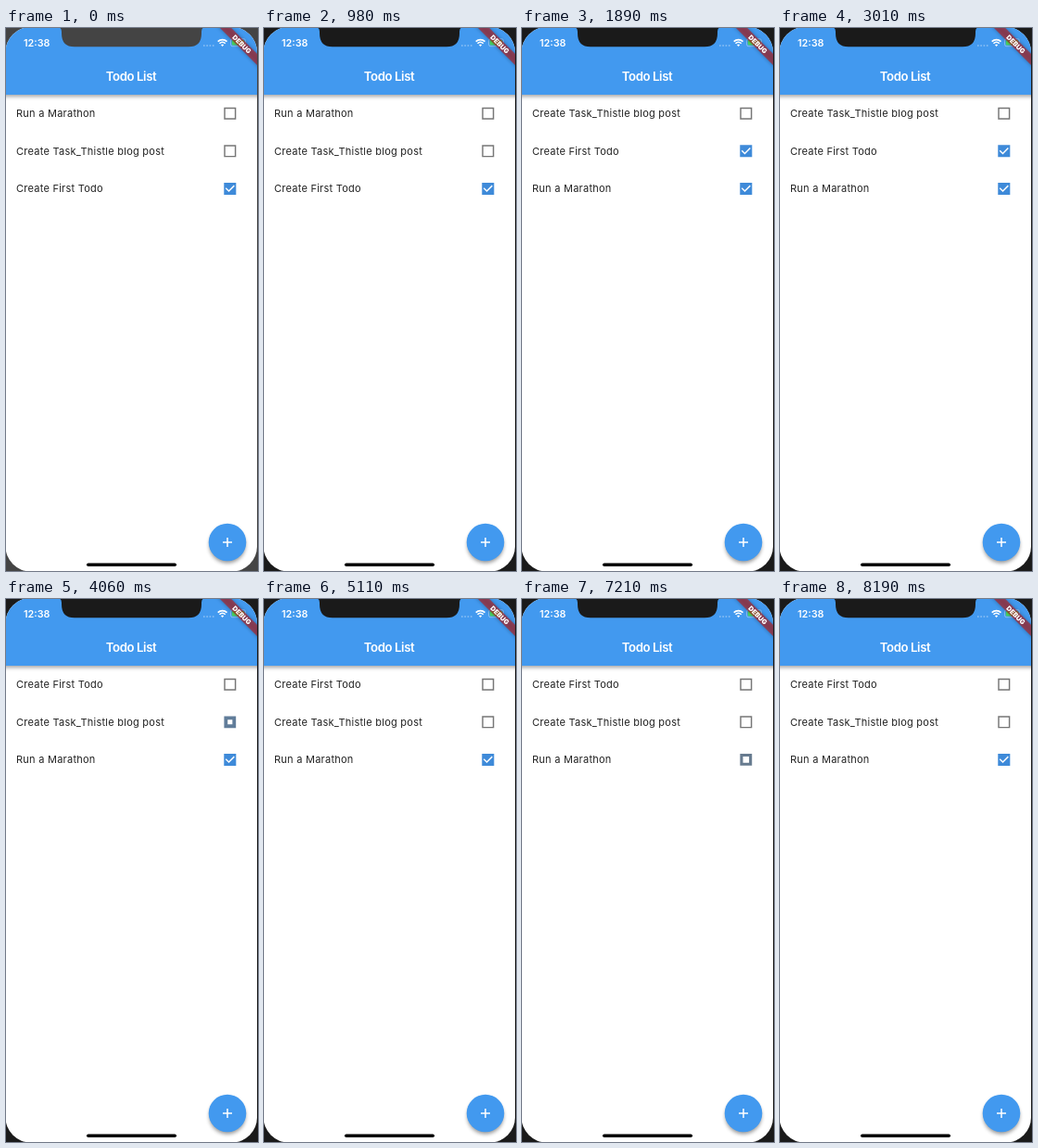
An HTML page for the animation above (8260 ms loop, 272 by 586 pixels).

```html
<!DOCTYPE html>
<html lang="en">
<head>
<meta charset="utf-8">
<title>Todo List</title>
<style>
  html, body { margin: 0; width: 100%; height: 100%; overflow: hidden; }
  svg { display: block; width: 272px; height: 586px; font-family: Inter, Roboto, sans-serif; }
  .row { font-size: 11px; letter-spacing: .25px; fill: #222; }
  .title { font-size: 13.2px; font-weight: 600; letter-spacing: -.4px; }
  .clock { font-size: 10.8px; font-weight: 600; }
  .debug { font-size: 7.2px; font-weight: 900; }
</style>
</head>
<body>
<svg viewBox="0 0 272 586">
  <defs>
    <clipPath id="screen"><rect x="-.5" y="-1" width="271.5" height="587.5" rx="27"/></clipPath>
    <filter id="blur" x="-50%" y="-50%" width="200%" height="200%"><feGaussianBlur stdDeviation="2.2"/></filter>
  </defs>
  <rect class="bezel" width="272" height="586"/>
  <g clip-path="url(#screen)">
    <rect width="272" height="586" fill="#fff"/>
    <g id="rows"></g>

    <rect x="-10" y="50" width="292" height="24" fill="#000" opacity=".36" filter="url(#blur)"/>
    <rect width="272" height="72" fill="#4299ef"/>
    <g fill="#fff">
      <text class="title" x="135" y="56.5" text-anchor="middle">Todo List</text>
      <text class="clock" x="19" y="20">12:38</text>
    </g>
    <path d="M213 19h12" stroke="#fff" stroke-width="1.6" stroke-dasharray="1.6 1.7" opacity=".4"/>
    <g fill="none" stroke="#fff" stroke-width="1.6">
      <path d="M228.7 14.6a7 7 0 0 1 9.8 0M230.5 16.7a4.4 4.4 0 0 1 6.2 0"/>
      <path d="M232 18.3a2.3 2.3 0 0 1 3.2 0l-1.6 1.7z" fill="#fff" stroke="none"/>
    </g>
    <rect x="242.5" y="11.7" width="16" height="8" rx="2" fill="none" stroke="#fff" stroke-opacity=".5" stroke-width=".7"/>
    <rect x="243.8" y="13" width="13.4" height="5.4" rx="1" fill="#4cd964"/>

    <g transform="translate(272 0) rotate(45)">
      <rect x="-40" y="20.3" width="80" height="8.7" fill="#000" opacity=".3" filter="url(#blur)"/>
      <rect x="-40" y="20.3" width="80" height="8.7" fill="#b71c1c" opacity=".63"/>
      <text class="debug" x="0" y="27.3" text-anchor="middle" fill="#fff">DEBUG</text>
    </g>

    <circle cx="239" cy="558" r="19.5" fill="#000" opacity=".42" filter="url(#blur)"/>
    <circle cx="239" cy="555" r="20.3" fill="#4299ef"/>
    <path d="M234 555h10M239 550v10" stroke="#fff" stroke-width="1.5"/>
    <rect x="87" y="577.4" width="97" height="3.6" rx="1.8" fill="#000"/>
  </g>
  <path class="bezel" d="M55-1Q60-1 60 4V6Q60 20.3 74 20.3H197Q211 20.3 211 6V4Q211-1 216-1Z"/>
</svg>
<script>
const LOOP = 8260, FOCUS = 980, TOGGLE = 200;
const ROW_TOP = 92.2, ROW_STEP = 40.6, SCALE = 0.725;

// [time, tapped row]
const taps = [[1575, 0], [3872, 1], [5270, 2], [5650, 2], [6030, 2], [6410, 2], [6790, 2], [7170, 2]];

// Each tap toggles one item, then the list is reversed and done items sink.
const states = [{
  start: -TOGGLE,
  items: [
    { name: 'Run a Marathon', done: false },
    { name: 'Create Task_Thistle blog post', done: false },
    { name: 'Create First Todo', done: true }
  ]
}];
for (const [start, row] of taps) {
  const items = states.at(-1).items
    .map((item, i) => i === row ? { ...item, done: !item.done } : item)
    .reverse()
    .sort((a, b) => a.done - b.done);
  states.push({ start, items });
}

const rows = [0, 1, 2].map(i => {
  const y = ROW_TOP + i * ROW_STEP;
  const g = document.createElementNS('http://www.w3.org/2000/svg', 'g');
  g.innerHTML = `<text class="row" x="11" y="${y + 4}"></text>
    <g transform="translate(241.8 ${y}) scale(${SCALE})">
      <path fill-rule="evenodd"/><path fill="none" stroke="#fff" stroke-width="2"/>
    </g>`;
  document.getElementById('rows').append(g);
  const [box, tick] = g.querySelectorAll('path');
  return { label: g.querySelector('text'), box, tick };
});

const clamp = v => Math.max(0, Math.min(1, v));
const mix = (a, b, t) => a + (b - a) * t;
const square = r => `M${-r} ${-r}H${r}V${r}H${-r}Z`;

// v: 0 is an empty box, 0.5 a solid one, 1 a ticked one
function drawCheckbox({ box, tick }, v) {
  const outer = 8 + Math.abs(v - 0.5) * 2;
  const hole = Math.max(0, outer - 2 - outer * 4 * v);
  const c = clamp(v * 4);
  box.setAttribute('d', square(outer) + (v < 0.5 && hole ? square(hole) : ''));
  box.setAttribute('fill', `rgb(${mix(117, 62, c)},${mix(117, 138, c)},${mix(117, 217, c)})`);

  const p = clamp(v * 2 - 1), a = clamp(p * 2), b = clamp(p * 2 - 1);
  tick.setAttribute('d', p
    ? `M-6.3-.9L${mix(-6.3, -1.8, a)} ${mix(-0.9, 3.6, a)}` +
      (b ? `L${mix(-1.8, 6.3, b)} ${mix(3.6, -4.5, b)}` : '')
    : '');
}

function draw(now) {
  const t = now % LOOP;
  const n = states.findLastIndex(s => t >= s.start);
  const { start, items } = states[n];
  const before = states[Math.max(0, n - 1)].items;
  const p = clamp((t - start) / TOGGLE);

  rows.forEach((row, i) => {
    const { name, done } = items[i];
    row.label.textContent = name;
    const eased = done ? p ** 1.72 : 1 - p ** 1.72;
    drawCheckbox(row, done === before[i].done ? +done : eased);
  });
  for (const el of document.querySelectorAll('.bezel'))
    el.setAttribute('fill', t < FOCUS ? '#444' : '#1a1a1a');
}

const begin = performance.now();
function tick() {
  draw(performance.now() - begin);
  requestAnimationFrame(tick);
}
tick();
</script>
</body>
</html>
```
